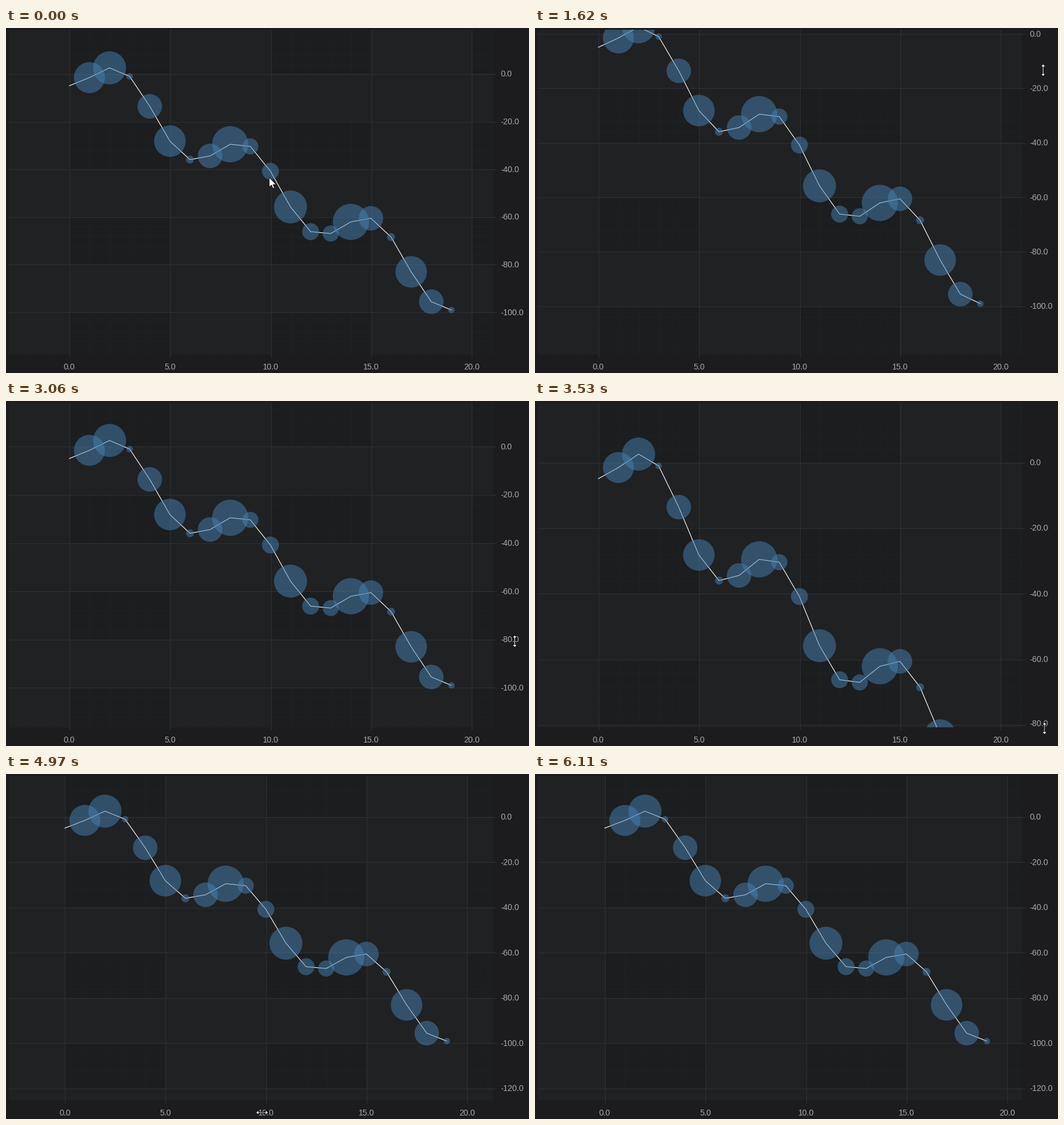
A matplotlib script that plays this animation: 896x591 px, repeating every 6790 ms.

```python
import numpy as np
import matplotlib.pyplot as plt
from matplotlib.animation import FuncAnimation
from matplotlib.collections import EllipseCollection, LineCollection, PolyCollection
from matplotlib.patches import Polygon, Rectangle

W, H, DPI = 896, 591, 100
LOOP, STEP = 6790, 35
LEFT, RIGHT, TOP, BOTTOM = 5, 834, 3, 559
X0, UNIT = 108.5, 34.45
PX = 72 / DPI

BACK, PLOT, BAND = "#1c1c1e", "#1b1d1e", "#202123"
MAJOR, LABEL, BUBBLE = "#303135", "#a9a9ac", "#4682b4"

# data: running sum of a shifted sine; bubble sizes mirror around point 11
xs = np.arange(20)
ys = np.cumsum(10 * np.sin(xs) - 5)
sizes = [1, 26.5, 28.3, 5.5, 21, 27, 6.8, 21, 31, 13.8, 14.5, 28.2]
radii = np.array(sizes + sizes[10:2:-1])

# eased pointer moves: start, end, x, y reached
START = (451, 256)
MOVES = [
    (440, 910, 866, 164),
    (1030, 1390, 873, 35),
    (1390, 2111, 863.9, 179),
    (2250, 2950, 871.5, 406.6),
    (3000, 3580, 873, 574),
    (3580, 3960, 882.5, 375),
    (4190, 4720, 446.5, 580),
    (4910, 5360, 285.8, 580),
    (5360, 5803, 457.5, 580),
    (5930, 6110, 589, 588),
]
BURSTS = np.array([0, 500, 1090, 1800, 2520, 3240, 3950, 4250, 4970, 5690, 5990])


def snap(t):
    start = BURSTS[BURSTS <= t][-1]
    return start + (t - start) // 60 * 60


def pointer(t):
    pos = np.array(START, float)
    for t0, t1, x, y in MOVES:
        u = np.clip((t - t0) / (t1 - t0), 0, 1)
        pos += (np.array([x, y]) - pos) * u * u * (3 - 2 * u)
    return pos


def view(t):
    """Horizontal shift, upper and lower value of the visible range."""
    shift = pointer(np.clip(t, 4910, 5810))[0] - 446.5
    y = pointer(min(t, 2200))[1]
    if t < 1390:
        high = np.interp(y, [35, 99.5, 164], [-4.4, 5.9, 18.5])
    else:
        high = np.interp(y, [35, 154, 179], [-4.4, 14.24, 18.15])
    low = -117.75 + 0.24 * (pointer(np.clip(t, 3000, 4010))[1] - 406.6)
    return shift, high, low


def ticks(lo, hi, gap):
    return np.arange(np.ceil(lo / gap), np.floor(hi / gap) + 1) * gap


def crisp(v):
    return np.floor(v) + 0.5


def box(x1, x2, y1, y2):
    return [(x1, y1), (x2, y1), (x2, y2), (x1, y2)]


def odd_cells(lo, hi, gap):
    """Every second interval of the axis, cut to the visible range."""
    first, last = int(np.floor(lo / gap)), int(np.floor(hi / gap))
    return [(max(k * gap, lo), min((k + 1) * gap, hi))
            for k in range(first, last + 1) if k % 2]


fig = plt.figure(figsize=(W / DPI, H / DPI), dpi=DPI, facecolor=BACK)
ax = fig.add_axes([0, 0, 1, 1])
ax.set_xlim(0, W)
ax.set_ylim(H, 0)
ax.axis("off")

area = Rectangle((LEFT, TOP), RIGHT - LEFT, BOTTOM - TOP, fc=PLOT, lw=0, zorder=0)
ax.add_patch(area)


def add_grid(color, z):
    lines = LineCollection([], colors=color, linewidths=PX, antialiaseds=False, zorder=z)
    ax.add_collection(lines, autolim=False)
    return lines


minor = add_grid(BAND, 1)
bands = PolyCollection([], facecolors=BAND, linewidths=0, antialiaseds=False, zorder=2)
ax.add_collection(bands, autolim=False)
major = add_grid(MAJOR, 3)

curve, = ax.plot([], [], color="white", lw=1.15 * PX, zorder=4)
curve.set_clip_path(area)
bubbles = EllipseCollection(2 * radii, 2 * radii, np.zeros(20), units="xy",
                            offsets=np.zeros((20, 2)), offset_transform=ax.transData,
                            facecolors=BUBBLE, alpha=0.5, linewidths=0, zorder=5)
ax.add_collection(bubbles, autolim=False)
bubbles.set_clip_path(area)


def label_pool(align):
    return [ax.text(0, 0, "", color=LABEL, ha=align, va="baseline", zorder=6,
                    family="Liberation Sans", size=14 * PX) for _ in range(12)]


x_labels, y_labels = label_pool("center"), label_pool("left")

ARROW = np.array([(0, 0), (0, 16.5), (3.8, 13), (6.5, 19), (9, 18), (6.5, 12.2), (11.8, 12)])
half = [(0, -10.5), (4, -6), (0.9, -6), (0.9, 6), (4, 6), (0, 10.5)]
UPDOWN = np.array(half + [(-x, y) for x, y in half[-2:0:-1]])
SIDEWAYS = UPDOWN[:, ::-1]
cursor = Polygon(ARROW, fc="white", ec="black", lw=0.8 * PX, joinstyle="miter", zorder=7)
ax.add_patch(cursor)


def fill_labels(pool, items):
    for text in pool:
        text.set_text("")
    for text, (value, x, y) in zip(pool, items):
        text.set_text(f"{value + 0.0:.1f}")
        text.set_position((x, y))


def draw(i):
    t = snap(i * STEP + STEP - 1)
    shift, high, low = view(t)
    scale = (BOTTOM - TOP) / (high - low)

    def px(v):
        return X0 + shift + UNIT * np.asarray(v)

    def py(v):
        return TOP + (high - np.asarray(v)) * scale

    x_lo, x_hi = ((e - X0 - shift) / UNIT for e in (LEFT, RIGHT))

    def grid(gap_x, gap_y, tail):
        across = [[(LEFT, y), (RIGHT + tail, y)] for y in crisp(py(ticks(low, high, gap_y)))]
        down = [[(x, TOP), (x, BOTTOM + tail)] for x in crisp(px(ticks(x_lo, x_hi, gap_x)))]
        return across + down

    minor.set_segments(grid(1, 4, 0))
    major.set_segments(grid(5, 20, 5))
    columns = [box(px(a), px(b), TOP, BOTTOM) for a, b in odd_cells(x_lo, x_hi, 5)]
    rows = [box(LEFT, RIGHT, py(a), py(b)) for a, b in odd_cells(low, high, 20)]
    bands.set_verts(columns + rows)

    curve.set_data(px(xs), py(ys))
    bubbles.set_offsets(np.column_stack([px(xs), py(ys)]))

    fill_labels(x_labels, [(v, np.clip(px(v), LEFT + 10, RIGHT - 14), 585)
                           for v in ticks(x_lo, x_hi, 5)])
    fill_labels(y_labels, [(v, 847, np.clip(np.round(py(v)), TOP + 7, BOTTOM - 7) + 5)
                           for v in ticks(low, high, 20)])

    x, y = pointer(t)
    shape = UPDOWN if x > RIGHT else SIDEWAYS if y > 564 else ARROW
    cursor.set_xy(shape + (x, y))
    cursor.set_visible(bool(t < 6110))
    return [minor, bands, major, curve, bubbles, cursor, *x_labels, *y_labels]


anim = FuncAnimation(fig, draw, frames=LOOP // STEP, interval=STEP,
                     init_func=lambda: draw(0), repeat=True, repeat_delay=0)
plt.show()
```
